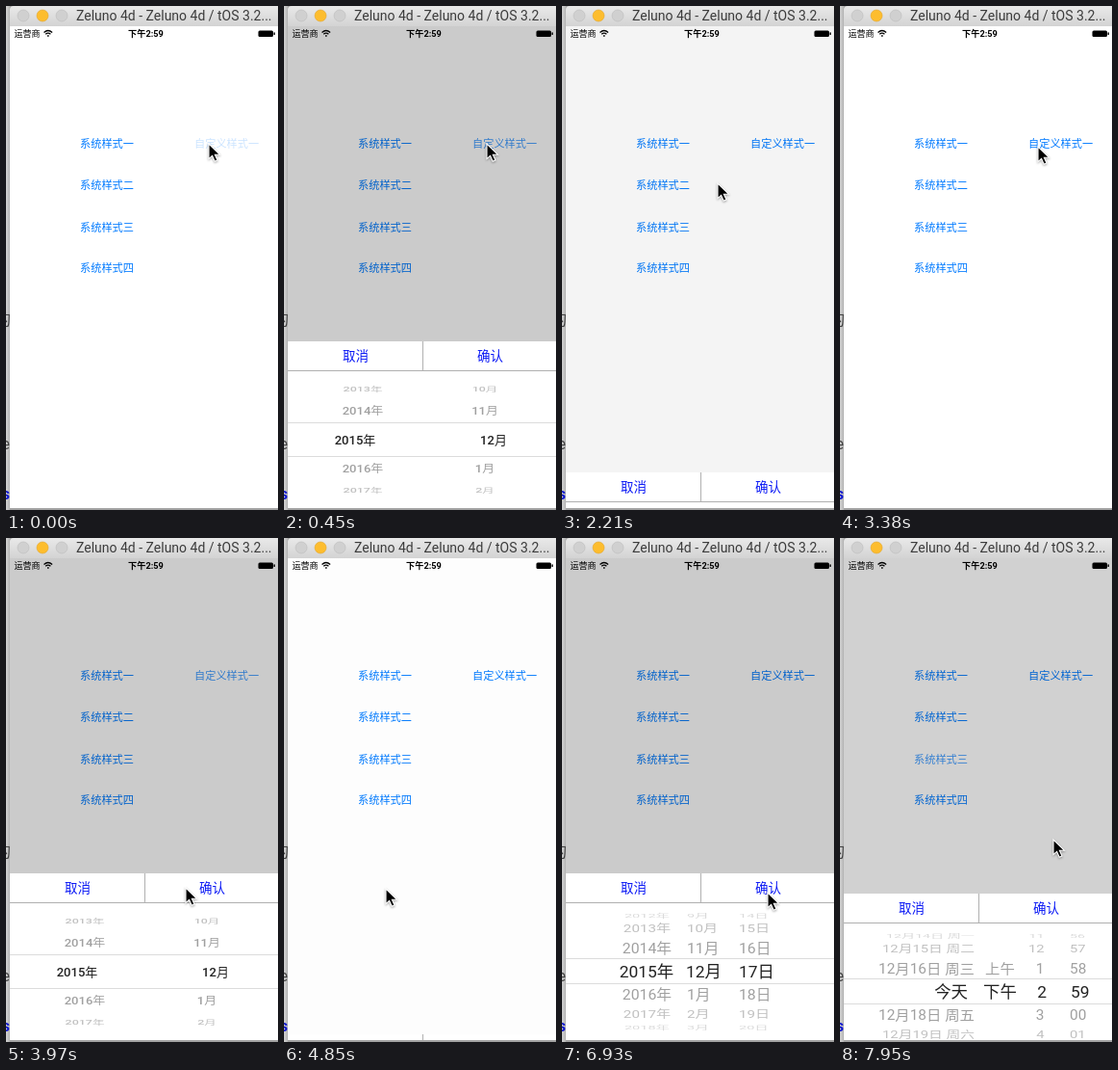
An HTML page for the animation above (8 s loop, 283 by 523 pixels).

```html
<!DOCTYPE html>
<html lang="zh">
<head>
<meta charset="utf-8">
<title>Picker demo</title>
<style>
html, body { margin: 0; width: 100%; height: 100%; overflow: hidden; background: #fff; }
svg { display: block; width: 283px; height: 523px; }
text { font-family: Roboto, "Noto Sans CJK SC", "Noto Sans CJK", sans-serif; white-space: pre; }
</style>
</head>
<body>
<svg viewBox="0 0 283 523">
  <defs>
    <linearGradient id="bar" x2="0" y2="1">
      <stop offset="0" stop-color="#e9e9e9"/><stop offset="1" stop-color="#d3d3d3"/>
    </linearGradient>
    <linearGradient id="edge">
      <stop offset="0" stop-color="#d6d6d6"/><stop offset="1" stop-color="#b2b2b2"/>
    </linearGradient>
    <clipPath id="screen"><rect x="4" y="21" width="279" height="500"/></clipPath>
    <clipPath id="wheel"><rect x="4" y="31" width="279" height="142"/></clipPath>
    <clipPath id="strip"><rect width="4" height="523"/></clipPath>
  </defs>

  <rect width="283" height="523" fill="#a3a3a3"/>
  <rect width="4" height="523" fill="url(#edge)"/>
  <g clip-path="url(#strip)" font-size="16" text-anchor="end">
    <text x="5" y="331" fill="#444">的</text>
    <text x="4" y="460" fill="#444">e</text>
    <text x="4" y="512" fill="#1018d0" font-weight="700">s</text>
  </g>

  <path d="M4 21V4q0-4 4-4H283V21Z" fill="url(#bar)"/>
  <g stroke-width=".6">
    <circle cx="18" cy="10" r="6" fill="#d0d0d0" stroke="#bdbdbd"/>
    <circle cx="38" cy="10" r="6" fill="#fdbd2e" stroke="#e2a42a"/>
    <circle cx="58" cy="10" r="6" fill="#d0d0d0" stroke="#bdbdbd"/>
  </g>
  <text x="73" y="15" font-size="14" fill="#3c3c3c">Zeluno 4d - Zeluno 4d / tOS 3.2...</text>

  <g clip-path="url(#screen)">
    <rect x="4" y="21" width="279" height="500" fill="#fff"/>
    <text x="8.5" y="32.2" font-size="9">运营商</text>
    <g fill="none" stroke="#000" stroke-width="1.3">
      <path d="M39.5 27.4q4.3-3.8 8.6 0M41.2 29.3q2.6-2.2 5.2 0"/>
      <path d="M43 31h1.6"/>
    </g>
    <text x="145.5" y="32.2" font-size="9.2" font-weight="700" text-anchor="middle">下午2:59</text>
    <rect x="262.5" y="25.5" width="15.5" height="6.5" rx="1.5"/>
    <rect x="278.5" y="27.3" width="1.4" height="2.8" rx=".6"/>
    <g id="buttons" font-size="11.2" fill="#007aff"></g>
    <rect id="dim" x="4" y="21" width="279" height="500"/>
    <g id="sheet">
      <rect x="4" width="279" height="180" fill="#fff"/>
      <path d="M4 30.5H283M144.5 0V30" stroke="#b0b0b0"/>
      <g font-size="13.5" fill="#0a18f5" text-anchor="middle">
        <text x="74.5" y="20.4">取消</text><text x="214.5" y="20.4">确认</text>
      </g>
      <g id="wheels" clip-path="url(#wheel)"></g>
    </g>
  </g>

  <path id="cursor" d="M0 0V15.6L3.6 12.3 6.2 18.2 9 17 6.4 11.2H11.4Z" stroke="#fff" stroke-width="1.1"
    style="filter:drop-shadow(0 1px 1px rgba(0,0,0,.35))"/>
</svg>
<script>
const LOOP = 8000, FRAME = 147.2, LEAD = 9;   // ms; the screen refreshes once per FRAME
const OPEN = 348, CLOSED = 521;
const $ = id => document.getElementById(id);
const clamp = u => Math.min(1, Math.max(0, u));
const easeInOut = u => (u = clamp(u), u * u * (3 - 2 * u));
const easeOut = u => 1 - (1 - clamp(u)) ** 3;

function add(parent, tag, attrs, text = '') {
  const el = document.createElementNS('http://www.w3.org/2000/svg', tag);
  for (const key in attrs) el.setAttribute(key, attrs[key]);
  el.textContent = text;
  return parent.appendChild(el);
}

const buttons = [
  ['系统样式一', 77, 143], ['系统样式二', 77, 186], ['系统样式三', 77, 230],
  ['系统样式四', 77, 272], ['自定义样式一', 196, 143]
].map(([label, x, y]) => add($('buttons'), 'text', { x, y: y + 4 }, label));

// Column: [label for row i, anchor, x when selected, x otherwise]
const month = i => (11 + i + 12) % 12 + 1 + '月';
const year = i => 2015 + i + '年';
const day = i => 17 + i + '日';
const date = i => i ? `12月${17 + i}日 周${'一二三四五六日'[3 + i]}` : '今天';
const half = i => ({ '-1': '上午', 0: '下午' })[i] || '';
const hour = i => (13 + i) % 12 + 1;
const minute = i => String((59 + i) % 60).padStart(2, '0');

const pickers = [
  { rows: 2, step: .5, big: 13, small: 13, band: 17.5, weight: 500,
    cols: [[year, 'middle', 74, 82], [month, 'middle', 218, 209]] },
  { rows: 3, step: .4, big: 17.4, small: 15.8, band: 13, weight: 400,
    cols: [[year, 'middle', 88, 88.5], [month, 'start', 129, 130], [day, 'start', 184, 184]] },
  { rows: 3, step: .4, big: 17.4, small: 15.4, band: 13, weight: 400,
    cols: [[date, 'end', 133, 140], [half, 'start', 149, 151], [hour, 'end', 215, 212.5],
      [minute, 'start', 240, 239]] }
];
const greys = ['#222', '#a0a0a0', '#c0c0c0', '#dadada'];

// Rows sit on a cylinder seen from the front.
const wheels = pickers.map(({ rows, step, big, small, band, weight, cols }) => {
  const g = add($('wheels'), 'g', { 'font-weight': weight });
  for (const y of [101.5 - band, 101.5 + band])
    add(g, 'path', { d: `M4 ${Math.floor(y) + .5}H283`, stroke: '#dcdcdc' });
  for (let i = -rows; i <= rows; i++) {
    const k = Math.abs(i), size = k ? small : big;
    const y = 102 + 62 * Math.sin(i * step), squash = Math.cos(i * step);
    const narrow = 1 - .04 * Math.max(0, k - 1);
    for (const [label, anchor, selectedX, x] of cols)
      add(g, 'text', {
        transform: `translate(${k ? x : selectedX} ${y}) scale(${narrow} ${squash})`,
        y: size * .36, 'font-size': size, 'text-anchor': anchor, fill: greys[k]
      }, label(i));
  }
  return g;
});

// All times below count frames.
const visits = [
  { press: 0, open: 1, close: 13.6, button: 4, picker: 0 },
  { press: 25, open: 25, close: 31.23, button: 4, picker: 0 },
  { press: 38, open: 39, close: 47.4, button: 1, picker: 1 },
  { press: 52, open: 53, close: Infinity, button: 2, picker: 2 }
];
// Cursor moves: [leave, arrive, x, y]
const moves = [
  [0, 0, 211, 143], [5, 10, 141, 222], [10, 13, 162, 184], [15, 25, 211, 142],
  [25, 27, 187, 363], [27, 29, 113, 375], [29, 30, 106, 364], [33, 38, 106, 183],
  [39, 46, 214, 368], [49, 52, 106, 227], [53, 54, 222, 313]
];

function cursorAt(n) {
  const i = moves.findLastIndex(([leave]) => leave <= n);
  const [leave, arrive, x, y] = moves[i];
  const [, , fromX, fromY] = moves[Math.max(0, i - 1)];
  const u = arrive > leave ? easeInOut((n - leave) / (arrive - leave)) : 1;
  return [fromX + (x - fromX) * u, fromY + (y - fromY) * u].map(Math.round);
}

function draw(n) {
  const { open, close, button, picker } = visits.findLast(v => v.press <= n);
  const since = n - open;
  const shown = easeOut(since / 1.98) * (1 - easeInOut((n - close) / 2));
  const top = Math.round(CLOSED + (OPEN - CLOSED) * shown);
  const opacity = since <= 0 ? .2 : since < 3 ? .75 : 1;

  $('cursor').setAttribute('transform', `translate(${cursorAt(n)})`);
  $('sheet').setAttribute('transform', `translate(0 ${top})`);
  $('dim').setAttribute('opacity', .204 * shown);
  wheels.forEach((g, i) => g.setAttribute('display', i === picker ? 'inline' : 'none'));
  buttons.forEach((b, i) => b.setAttribute('opacity', i === button ? opacity : 1));
}

const start = performance.now();
(function tick() {
  const t = (performance.now() - start) % LOOP;
  draw(Math.floor((t + LEAD) / FRAME));
  requestAnimationFrame(tick);
})();
</script>
</body>
</html>
```
